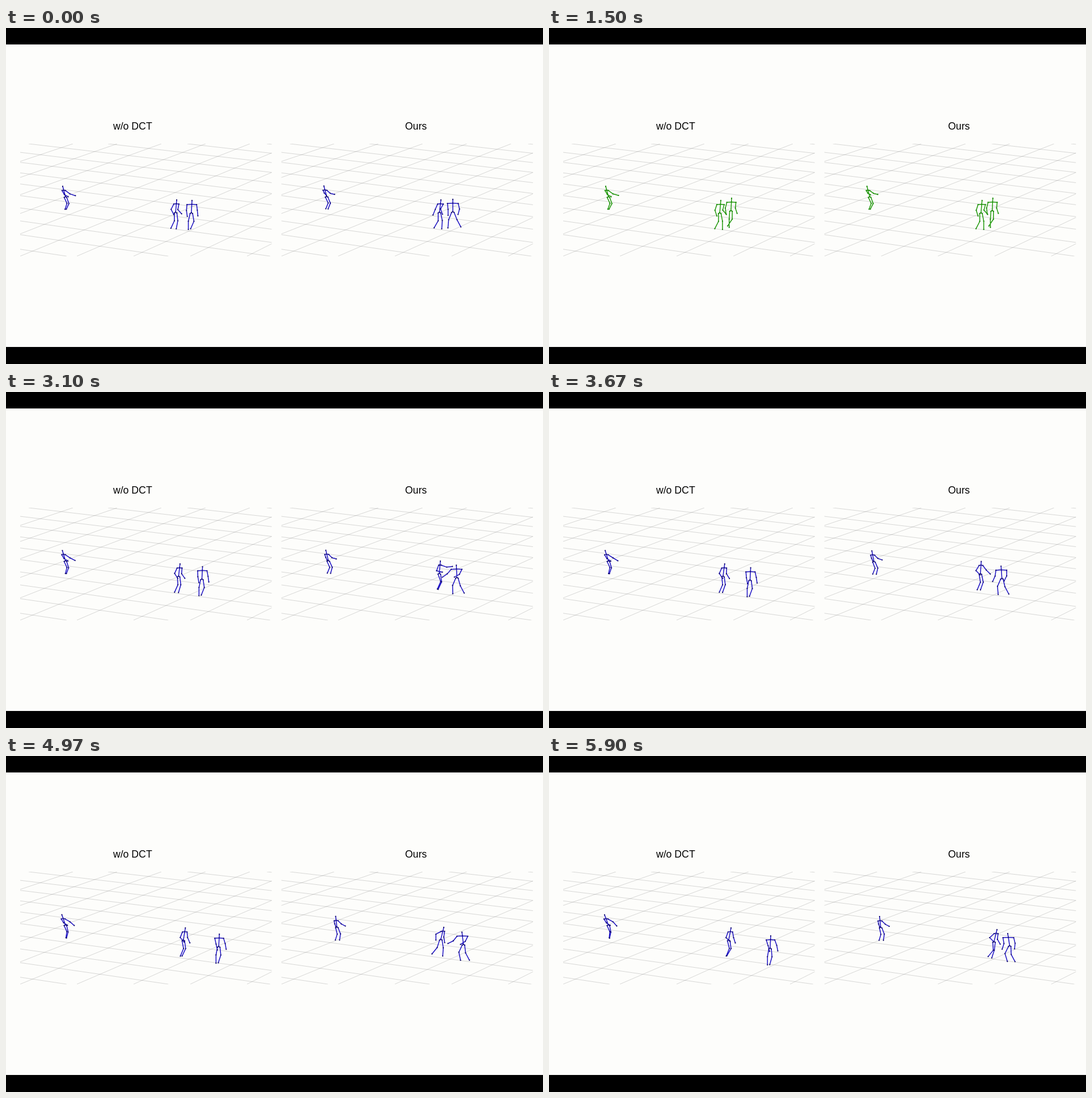
Write an HTML page that moves like this. It is 947 by 592 pixels and loops after 5.93 s.

```html
<!DOCTYPE html>
<html lang="en">
<head>
<meta charset="utf-8">
<title>Motion comparison</title>
<style>
  html, body { margin: 0; width: 100%; height: 100%; overflow: hidden; background: #000; }
  svg { display: block; }
  text { font: 17.7px "Liberation Sans", Arial, sans-serif; text-anchor: middle; }
  .grid { fill: none; stroke: #777778; stroke-opacity: .32; stroke-width: .9; }
  .bones { fill: none; stroke-width: 1.5; stroke-linejoin: round; }
  .joints { fill: none; stroke-width: 2.3; stroke-linecap: round; }
</style>
</head>
<body>
<svg width="947" height="592" viewBox="0 0 947 592">
  <defs>
    <clipPath id="panel"><rect x="25" y="204" width="443.5" height="198.5"/></clipPath>
    <path id="floor" class="grid" clip-path="url(#panel)"/>
  </defs>
  <rect y="29" width="947" height="533" fill="#fdfdfb"/>
  <text x="223.3" y="179.3">w/o DCT</text>
  <text x="723" y="179.3">Ours</text>
  <use href="#floor"/>
  <use href="#floor" x="460.7"/>
  <path class="bones" id="bones"/>
  <path class="joints" id="joints"/>
</svg>
<script>
const LOOP = 5930, START = 630, PREDICT = 1700, POSTER = 1930, END = 5900;
const PANEL = 460.7;
const byId = id => document.getElementById(id);

// Perspective floor: each line runs from the top edge to the bottom edge.
let floor = '';
for (let i = 0; i < 12; i++) floor += `M${118 + 78 * i} 204L${-475 + 100 * i} 402`;
for (let i = 0; i < 15; i++) {
  const x = 460 - 140 * i;
  floor += `M${x} 204L${x + 198 * (x + 5924) / 702} 402`;
}
byId('floor').setAttribute('d', floor);

// A pose is the head position, spine angle, half shoulder width and the
// [upper, lower] angle of each limb. Angles are degrees from straight down.
const pose = (x, y, spine, width, armL, armR, legL, legR) =>
  [x, y, spine, width, ...armL, ...armR, ...legL, ...legR];
const mix = (a, b, f) => a.map((v, i) => v + (b[i] - v) * f);
const clamp = v => Math.min(1, Math.max(0, v));
const smooth = f => f * f * (3 - 2 * f);
const linear = f => f;

// Body proportions: neck, back, thigh, shin, left arm bone, right arm bone.
const near = { neck: 6.5, back: 15, thigh: 13.8, shin: 14.5, armL: 10.5, armR: 10 };
const far = { neck: 7, back: 11.7, thigh: 11.5, shin: 11, armL: 8, armR: 10 };

const seen = {
  alone: pose(100, 279, 15, 3, [30, 60], [54, 75], [25, -20], [20, -27]),
  left: pose(303, 304, -5, 6.5, [-18, 18], [-15, 40], [0, -27], [11, 0]),
  right: pose(322, 300, -3, 8, [-15, 7], [-6, 18], [-4, 0], [0, -34])
};

// The right fighter swings both arms forward and back.
function punch(p, t) {
  const reach = t < 2165 ? 0 : (1 - Math.cos((t - 2165) / 1870 * 2 * Math.PI)) / 2;
  const arms = pose(0, 0, 0, 0, [-48, -50], [-40, -50], [0, 0], [0, 0]);
  return p.map((v, i) => v + arms[i] * reach);
}

const people = [
  {
    body: far, past: seen.alone, drift: 0, keys: [
      [POSTER, pose(100, 279, 15, 3, [30, 60], [54, 72], [25, -18], [20, -25])],
      [END, pose(98, 280, 21, 3.5, [32, 56], [61, 42], [24, -5], [11, -12])]
    ]
  },
  {
    body: near, past: seen.left, drift: 1, keys: [
      [POSTER, pose(301, 303, -5, 4.5, [-27, 27], [-11, 42], [0, -25], [7, -11])],
      [END, pose(321, 303, -11, 4, [-20, 45], [10, 18], [14, -22], [8, -30])]
    ]
  },
  {
    body: near, past: seen.right, drift: -4, keys: [
      [POSTER, pose(328, 304, -3, 8.5, [-5, 8], [7, 6], [-13, 0], [10, -24])],
      [END, pose(391, 317, -3, 7.5, [18, 14], [20, 11], [-10, 0], [5, -16])]
    ]
  },
  {
    body: { ...far, armL: 5.5, armR: 8 }, past: seen.alone, dx: PANEL, drift: 0, ease: smooth, keys: [
      [2300, pose(560.5, 278, 15, 3.5, [20, 27], [45, 76], [26, -24], [25, -17])],
      [5500, pose(583, 283, 6, 3.5, [10, 20], [45, 62], [13, -17], [21, -8])]
    ]
  },
  {
    body: near, past: seen.left, dx: PANEL, drift: 1, keys: [
      [POSTER, pose(767, 303, -7, 5, [-24, -22], [-29, 20], [0, -30], [12, -4])],
      [3100, pose(766, 298, -5, 2.5, [-20, 77], [70, 97], [20, -24], [8, -25])],
      [4170, pose(759, 299, -3, 4, [-42, 15], [8, 0], [0, -22], [15, -15])],
      [4970, pose(772, 302, -14, 3, [-62, 0], [-8, 9], [-18, -39], [9, -4])],
      [END, pose(790, 306, -14, 3.5, [-48, 45], [-7, 30], [4, -39], [-7, -18])]
    ]
  },
  {
    body: near, past: seen.right, dx: PANEL, drift: -4, act: punch, keys: [
      [POSTER, pose(788, 302, 0, 9.5, [6, 0], [13, -15], [-22, -5], [22, 28])],
      [END, pose(809, 313, 9, 9.5, [10, -18], [14, -5], [-26, 17], [2, 28])]
    ]
  }
];

for (const p of people) {
  const [x, y, ...rest] = p.past;
  const left = x + (p.dx || 0);
  p.keys.unshift([START, [left + p.drift, y + 2, ...rest]], [1500, [left, y, ...rest]]);
}

function poseAt({ keys, ease = linear, act }, t) {
  let i = 0;
  while (i < keys.length - 2 && t >= keys[i + 1][0]) i++;
  const [t0, a] = keys[i], [t1, b] = keys[i + 1];
  const p = mix(a, b, ease(clamp((t - t0) / (t1 - t0))));
  return act ? act(p, t) : p;
}

const step = ([x, y], angle, length) => {
  const r = angle * Math.PI / 180;
  return [x + Math.sin(r) * length, y + Math.cos(r) * length];
};

// Forward kinematics: three chains of points for arms, spine and legs.
function skeleton(body, p) {
  const [x, y, spine, width, la, lf, ra, rf, lt, ls, rt, rs] = p;
  const head = [x, y];
  const neck = step(head, spine, body.neck);
  const pelvis = step(neck, spine, body.back);
  const limb = (from, upper, lower, a, b) => {
    const mid = step(from, upper, a);
    return [from, mid, step(mid, lower, b)];
  };
  const side = ([px, py], dx, dy) => [px + dx, py + dy];
  const { armL, armR, thigh, shin } = body;
  return [
    [...limb(side(neck, -width, .7), la, lf, armL, armL).reverse(), neck,
      ...limb(side(neck, width, .7), ra, rf, armR, armR)],
    [head, neck, pelvis],
    [...limb(side(pelvis, -2.2, 1.5), lt, ls, thigh, shin).reverse(), pelvis,
      ...limb(side(pelvis, 2.2, 1.5), rt, rs, thigh, shin)]
  ];
}

const bones = byId('bones'), joints = byId('joints');
const point = p => p.map(v => v.toFixed(2)).join(' ');

function draw(now) {
  const t = now % LOOP;
  const time = t < START ? POSTER : t;
  const observed = time < PREDICT;
  const chains = people.flatMap(p => skeleton(p.body, poseAt(p, time)));
  bones.setAttribute('d', chains.map(c => 'M' + c.map(point).join('L')).join(''));
  joints.setAttribute('d', chains.flat().map(p => `M${point(p)}h0`).join(''));
  bones.setAttribute('stroke', observed ? '#219a0c' : '#1b10c4');
  joints.setAttribute('stroke', observed ? '#1d8a0c' : '#18126e');
}

const begin = performance.now();
function tick() {
  draw(performance.now() - begin);
  requestAnimationFrame(tick);
}
tick();
</script>
</body>
</html>
```
